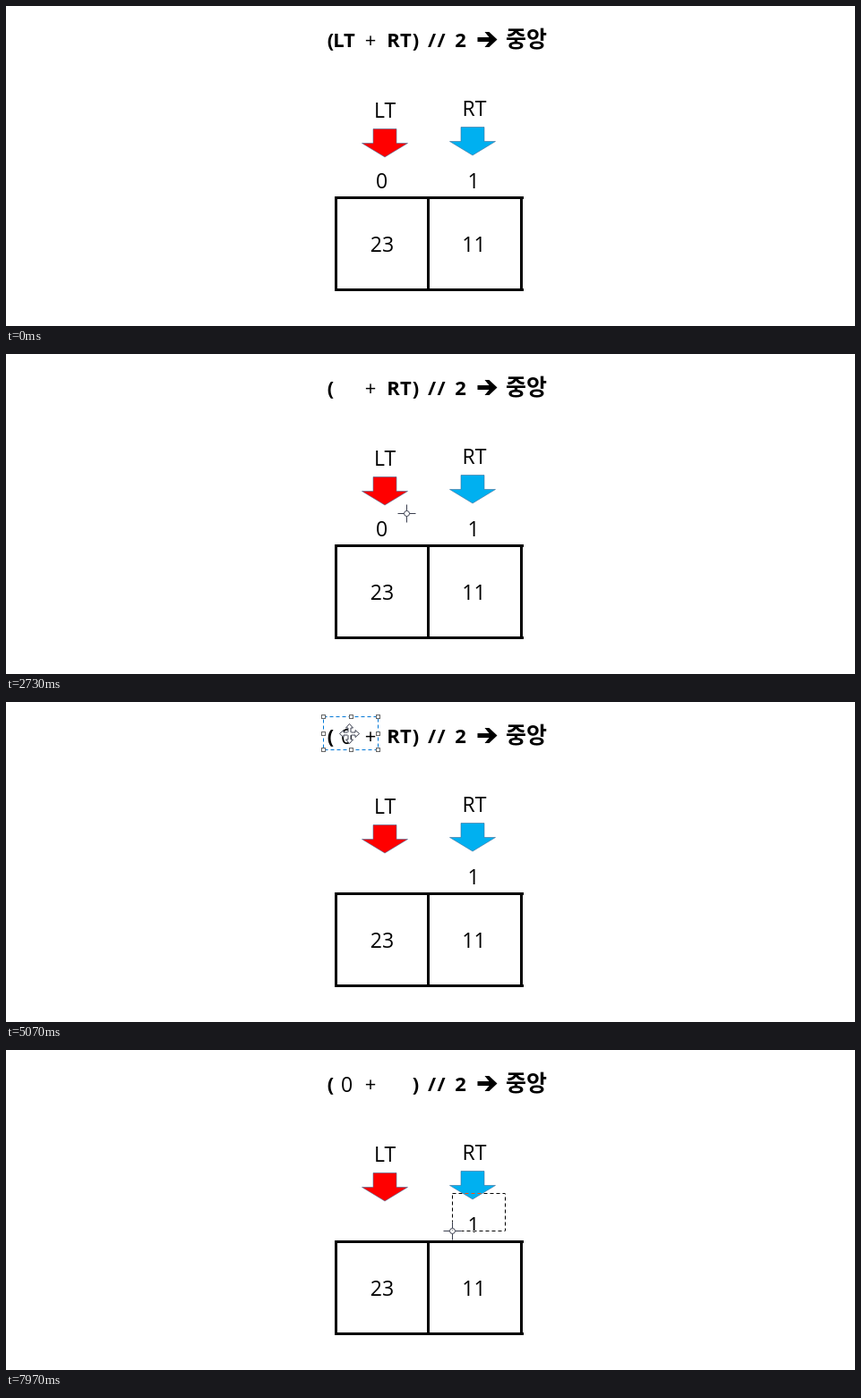
Recreate the animation shown at these times as an HTML page with a canvas. Size 948 px wide and 358 px high, loop 8 s.

```html
<!DOCTYPE html>
<html lang="ko">
<head>
<meta charset="utf-8">
<style>
  html, body { margin: 0; width: 100%; height: 100%; overflow: hidden; background: #fff; }
  canvas { display: block; }
</style>
</head>
<body>
<canvas width="948" height="358"></canvas>
<script>
const ctx = document.querySelector('canvas').getContext('2d');
const LOOP = 8000;
const LATIN = '"Open Sans", "Noto Sans", sans-serif';
const HANGUL = '"Noto Sans CJK KR", "Noto Sans CJK", sans-serif';
const INK = '#3c4050';

// Pointer moves: each one eases from where the last one ended.
const START = { x: 452, y: 322 };
const move = (from, to, x, y) => ({ from, to, x, y });
const MOVES = [
  move(600, 1230, 398, 73),
  move(1230, 1770, 363, 6),
  move(1930, 2000, 368, 6),
  move(2300, 2730, 447, 178),
  move(2770, 2860, 454, 173),
  move(2860, 3330, 393, 210),
  move(3500, 3850, 422, 192),
  move(4200, 4900, 383, 35),
  move(5130, 5780, 453, 71),
  move(5780, 6400, 420, 7),
  move(6870, 7100, 517, 136),
  move(7130, 7570, 557, 160),
  move(7570, 7970, 498, 202)
];

// Marquees are drawn between press and release, then show handles until gone.
const PICK_LT = { press: 1230, release: 2300, gone: 2400 };
const PICK_ZERO = { press: 2860, release: 3500, gone: 4050 };
const PICK_RT = { press: 5780, release: 6870, gone: 6960 };
const PICK_ONE = { press: 7570, release: LOOP, gone: LOOP };
const GRAB = 4200, DROP = 5070, LEAVE = 5260;

const clamp = (v, lo, hi) => Math.min(Math.max(v, lo), hi);

function pointerAt(t) {
  let { x, y } = START;
  for (const m of MOVES) {
    const left = 1 - clamp((t - m.from) / (m.to - m.from), 0, 1);
    const k = 1 - left * left;
    x += (m.x - x) * k;
    y += (m.y - y) * k;
  }
  return [Math.round(x), Math.round(y)];
}

function text(str, x, baseline, size = 23, weight = 400, family = LATIN) {
  ctx.font = `${weight} ${size}px ${family}`;
  ctx.fillStyle = '#000';
  ctx.fillText(str, x, baseline);
}
const bold = (str, x) => text(str, x, 46, 22, 700);

function polygon(points, fill, stroke) {
  ctx.beginPath();
  points.forEach(([x, y]) => ctx.lineTo(x, y));
  ctx.closePath();
  ctx.fillStyle = fill;
  ctx.fill();
  if (!stroke) return;
  ctx.lineWidth = 1;
  ctx.strokeStyle = stroke;
  ctx.stroke();
}

// An outline given on one side of the vertical axis, completed by its mirror image
const mirrored = half => [...half, ...half.map(([x, y]) => [-x, y]).reverse()];

function downArrow(cx, top, fill) {
  const outline = mirrored([[13, 0], [13, 16], [25.5, 16], [0, 31.5]]);
  polygon(outline.map(([x, y]) => [cx + x, top + y]), fill, 'rgba(65,113,156,.6)');
}

function formulaArrow(tipX, cy) {
  const outline = mirrored([[2.5, 22], [2.5, 9], [8.5, 14], [8.5, 9], [0, 0]]);
  polygon(outline.map(([x, y]) => [tipX - y, cy + x]), '#000');
}

function drawFormula(t) {
  bold('(', 362.5);
  if (t < PICK_LT.gone) bold('LT', 377.5);
  text('+', 407, 46, 22);
  if (t < PICK_RT.gone) bold('RT', 439);
  bold(')', 457.5);
  bold('/', 475.5);
  bold('/', 486);
  bold('2', 507.5);
  formulaArrow(548.5, 37.5);
  text('중앙', 581, 46, 25, 700, HANGUL);
}

function drawArray() {
  text('LT', 423, 125);
  text('RT', 523, 123);
  downArrow(423, 137.5, '#f00');
  downArrow(521, 135.5, '#00b0f0');
  text('1', 522, 204);
  text('23', 420, 275);
  text('11', 522.5, 275);
  ctx.fillStyle = '#000';
  for (const y of [213, 316]) ctx.fillRect(367, y, 211, 3);
  for (const x of [367, 470, 574]) ctx.fillRect(x, 213, 3, 106);
}

// The zero rides along with the pointer while it is dragged.
function drawZero(t) {
  const [x, y] = pointerAt(clamp(t, GRAB, DROP));
  text('0', x - 2.5, y + 12);
}

function dashedBox(x0, y0, x1, y1, color) {
  ctx.strokeStyle = color;
  ctx.lineWidth = 1;
  ctx.setLineDash([4, 3]);
  ctx.strokeRect(x0 + .5, y0 + .5, x1 - x0, y1 - y0);
  ctx.setLineDash([]);
}

function handleBox(x0, y0, x1, y1) {
  dashedBox(x0, y0, x1, y1, '#0078d7');
  const mx = Math.round((x0 + x1) / 2), my = Math.round((y0 + y1) / 2);
  ctx.fillStyle = '#fff';
  ctx.strokeStyle = '#666';
  for (const x of [x0, mx, x1]) for (const y of [y0, my, y1]) {
    if (x === mx && y === my) continue;
    ctx.fillRect(x - 2, y - 2, 5, 5);
    ctx.strokeRect(x - 1.5, y - 1.5, 4, 4);
  }
}

function drawMarquee(t, { press, release, gone }) {
  if (t < press || t >= gone) return;
  const [ax, ay] = pointerAt(press), [px, py] = pointerAt(Math.min(t, release));
  const box = [Math.min(ax, px), Math.min(ay, py), Math.max(ax, px), Math.max(ay, py)];
  if (t >= release) return handleBox(...box);
  ctx.globalCompositeOperation = 'difference';
  dashedBox(...box, '#fff');
  ctx.globalCompositeOperation = 'source-over';
}

function crosshair(x, y) {
  ctx.beginPath();
  for (const [dx, dy] of [[1, 0], [-1, 0], [0, 1], [0, -1]]) {
    ctx.moveTo(x + dx * 3, y + dy * 3);
    ctx.lineTo(x + dx * 10, y + dy * 10);
  }
  ctx.moveTo(x + 3, y);
  ctx.arc(x, y, 3, 0, 7);
  for (const [width, color] of [[3, '#fff'], [1, INK]]) {
    ctx.lineWidth = width;
    ctx.strokeStyle = color;
    ctx.stroke();
  }
}

function moveCursor(x, y) {
  const arm = mirrored([[1.5, -2], [1.5, -6.5], [4, -6.5], [0, -11]]).reverse();
  const points = [];
  for (let turn = 0; turn < 4; turn++) {
    const c = Math.cos(turn * Math.PI / 2), s = Math.sin(turn * Math.PI / 2);
    arm.forEach(([u, v]) => points.push([x + u * c - v * s, y + u * s + v * c]));
  }
  polygon(points, '#fff', INK);
}

function draw(t) {
  ctx.fillStyle = '#fff';
  ctx.fillRect(0, 0, 948, 358);
  ctx.textAlign = 'center';
  drawFormula(t);
  drawArray();
  drawZero(t);
  for (const pick of [PICK_LT, PICK_ZERO, PICK_RT, PICK_ONE]) drawMarquee(t, pick);
  if (t >= DROP && t < LEAVE) handleBox(354, 16, 415, 53);

  if (t < MOVES[0].from) return;
  const [x, y] = pointerAt(t);
  const cursor = t >= PICK_ZERO.release + 100 && t < LEAVE ? moveCursor : crosshair;
  cursor(x + .5, y + .5);
}

function frame() {
  draw(performance.now() % LOOP);
  requestAnimationFrame(frame);
}
frame();
</script>
</body>
</html>
```
